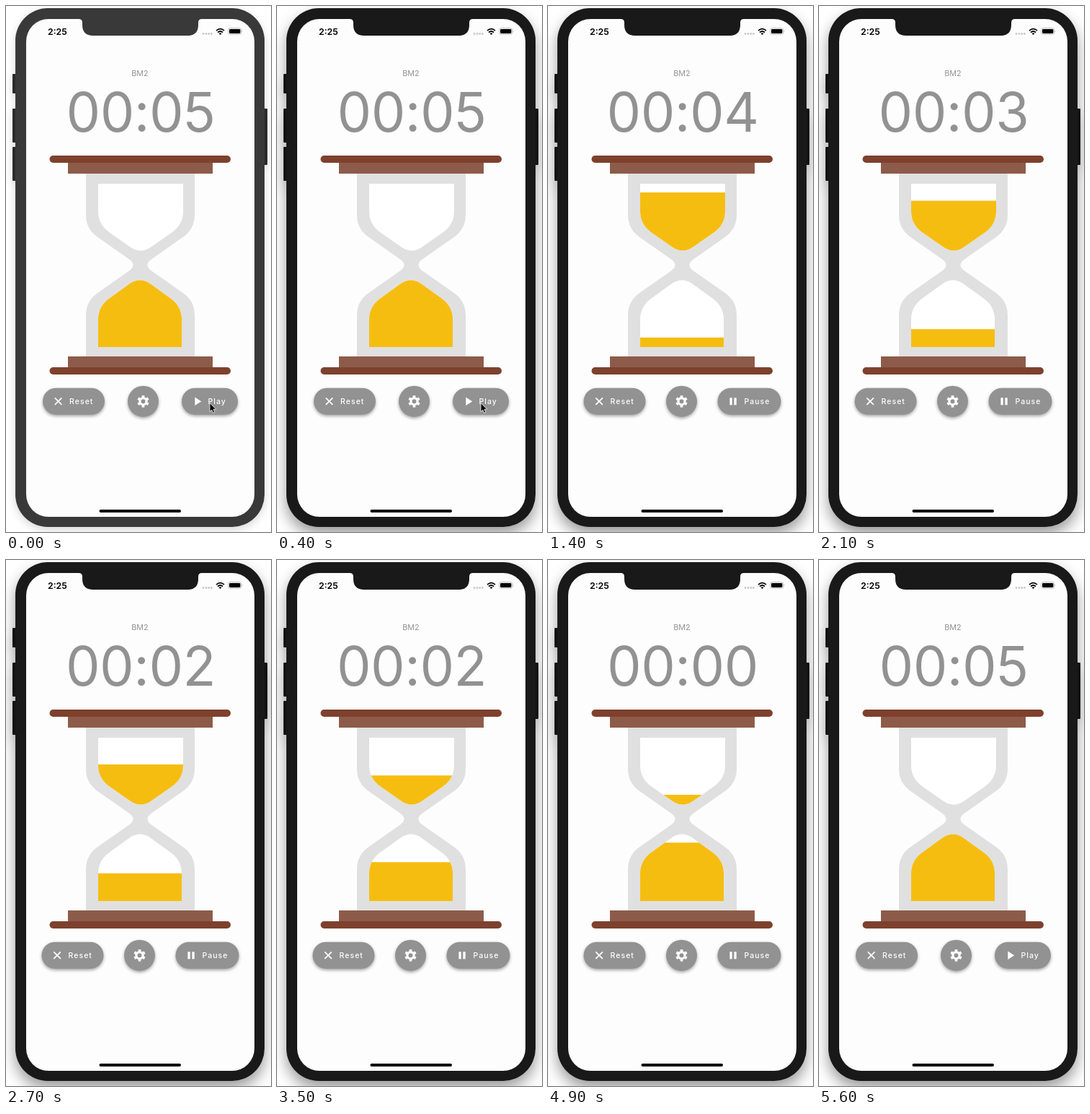
These frames come from a looping animation (368x728 px, 6.4 s). An HTML page:

```html
<!DOCTYPE html>
<html lang="en">
<head>
<meta charset="utf-8">
<title>Hourglass timer</title>
<style>
  html, body { margin: 0; width: 100%; height: 100%; overflow: hidden; background: #fff; }
  svg { display: block; width: 368px; height: 728px; font-family: Inter, sans-serif; }
  .btn { filter: drop-shadow(0 2px 2px rgba(0, 0, 0, .35)); fill: #929292; }
  .label { font-size: 10.5px; font-weight: 500; letter-spacing: 1.05px; fill: #fff; }
  .icon { fill: none; stroke: #fff; }
  .sand { fill: #f6bd11; }
</style>
</head>
<body>
<svg viewBox="0 0 368 728">
  <defs>
    <clipPath id="topClip"><path class="topBulb"/></clipPath>
    <clipPath id="bottomClip"><path class="bottomBulb"/></clipPath>
  </defs>

  <g id="phone">
    <path id="keys" d="M9 95q0-1 1-1h5v27h-5q-1 0-1-1zM9 143q0-1 1-1h5v47h-5q-1 0-1-1zM9 196q0-1 1-1h5v47h-5q-1 0-1-1zM357 142h5q1 0 1 1v76q0 1-1 1h-5z"/>
    <rect id="body" x="13" y="3" width="346" height="718" rx="45"/>
  </g>
  <rect x="28" y="18" width="317" height="689" rx="31" fill="#fdfdfd"/>
  <path id="notch" d="M101 17.5V18q5 0 5 5v3q0 15 15 15h131q15 0 15-15v-3q0-5 5-5v-.5z"/>

  <!-- status bar -->
  <text x="58" y="39.5" font-size="12.3" font-weight="600">2:25</text>
  <g fill="#c9c9c9">
    <circle cx="274" cy="38.5" r="1.4"/><circle cx="278" cy="38.5" r="1.4"/>
    <circle cx="281.7" cy="38.5" r="1.4"/><circle cx="285.3" cy="38.5" r="1.4"/>
  </g>
  <g fill="none" stroke="#000" stroke-width="1.7">
    <path d="M292 34.2q5.5-5 11 0M294 36.5q3.5-3 7 0"/>
    <path d="M297.5 40l-2-2q2-1.5 4 0z" fill="#000" stroke="none"/>
  </g>
  <rect x="308.7" y="30.7" width="18" height="8.6" rx="2.5" fill="none" stroke="#aaa" stroke-width=".8"/>
  <rect x="310" y="32" width="15.4" height="6" rx="1.4"/>
  <path d="M327.7 33.5q1.6 1.5 0 3z" fill="#aaa"/>

  <g text-anchor="middle" fill="#929292">
    <text x="186" y="97" font-size="10.8">BM2</text>
    <text id="clock" x="187" y="174" font-size="75.5" letter-spacing="-.5"></text>
  </g>

  <!-- hourglass -->
  <path fill="#e0e0e0" d="M111 232V289Q111 308 126 319L171 350.5Q182 358.5 171 366.5L126 398Q111 409 111 428V485H262V428Q262 409 247 398L202 366.5Q191 358.5 202 350.5L247 319Q262 308 262 289V232z"/>
  <path class="topBulb" fill="#fff"/>
  <path class="bottomBulb" fill="#fff"/>
  <g clip-path="url(#topClip)"><rect id="topSand" class="sand" x="120" width="134" height="120"/></g>
  <g clip-path="url(#bottomClip)"><rect id="bottomSand" class="sand" x="120" width="134" height="120"/></g>
  <g fill="#8d5b49">
    <rect x="86" y="216" width="201" height="16"/><rect x="86" y="485" width="201" height="16"/>
  </g>
  <g fill="#7d412e">
    <rect x="60.5" y="207" width="251.5" height="10" rx="5"/><rect x="60.5" y="500" width="251.5" height="10" rx="5"/>
  </g>

  <!-- controls -->
  <g id="reset">
    <rect class="btn" x="51" y="528.7" width="86" height="37" rx="18.5"/>
    <path class="icon" stroke-width="1.7" d="M67.8 542.3l9.6 9.6m0-9.6l-9.6 9.6"/>
    <text class="label" x="88" y="551">Reset</text>
  </g>
  <g id="settings">
    <circle class="btn" cx="190.5" cy="547.2" r="21.5"/>
    <circle class="icon" cx="190.5" cy="547.2" r="4.6" stroke-width="3.2"/>
    <circle class="icon" cx="190.5" cy="547.2" r="6.9" stroke-width="2.8" pathLength="12" stroke-dasharray="1 1" stroke-dashoffset="-.5"/>
  </g>
  <g id="play">
    <rect class="btn" x="244" y="528.7" width="78" height="37" rx="18.5"/>
    <path fill="#fff" d="M262.3 541.5v11.4l8.9-5.7z"/>
    <text class="label" x="280.5" y="551">Play</text>
  </g>
  <g id="pause">
    <rect class="btn" x="235.5" y="528.7" width="88" height="37" rx="18.5"/>
    <path fill="#fff" d="M252.4 542.2h3.3v10h-3.3zM258.4 542.2h3.3v10h-3.3z"/>
    <text class="label" x="272.5" y="551">Pause</text>
  </g>

  <rect x="129.5" y="697" width="113.5" height="4" rx="2"/>
  <path id="cursor" d="M283 549.5v12l2.8-2.5 1.8 4.2 2.2-.9-1.9-4.1h3.8z" stroke="#fff" stroke-width=".8"/>
</svg>

<script>
const LOOP = 6400, START = 800, END = 5500;
const digitTimes = [1700, 2700, 3900, 4900];
const sandTimes = [1400, 1700, 2000, 2400, 2700, 3100, 3500, 3900, 4300, 4900];
const $ = id => document.getElementById(id);
const show = (id, on) => $(id).style.display = on ? "" : "none";

// One chamber of the glass; dir = 1 narrows downwards, -1 upwards.
function bulb(right, base, dir) {
  const left = 128, mid = (left + right) / 2, y = d => base + dir * d;
  return `M${left} ${base}V${y(38)}Q${left} ${y(56)} ${left + 15} ${y(67)}` +
    `L${mid - 14.5} ${y(87.5)}Q${mid} ${y(97.5)} ${mid + 14.5} ${y(87.5)}` +
    `L${right - 15} ${y(67)}Q${right} ${y(56)} ${right} ${y(38)}V${base}z`;
}
for (const p of document.querySelectorAll(".topBulb")) p.setAttribute("d", bulb(246, 246, 1));
for (const p of document.querySelectorAll(".bottomBulb")) p.setAttribute("d", bulb(244, 472, -1));

function draw(t) {
  const running = t >= START && t < END;

  // The window gains focus: darker body, deeper shadow.
  const focus = Math.min(1, t / 400), grey = 57 - 32 * focus;
  const shade = v => `rgb(${v},${v},${v})`;
  $("body").style.fill = $("notch").style.fill = shade(grey);
  $("keys").style.fill = shade(grey * .75);
  $("phone").style.filter =
    `drop-shadow(0 ${4 + 6 * focus}px ${6 + 4 * focus}px rgba(0,0,0,${.16 + .24 * focus}))`;

  const elapsed = digitTimes.filter(d => t >= d).length;
  $("clock").textContent = "00:0" + (running ? 4 - elapsed : 5);

  // The sand level is refreshed in steps.
  const refreshed = t < 1400 ? t : sandTimes.filter(s => t >= s).pop();
  const progress = running ? (refreshed - 770) / 4810 : 1;
  $("topSand").setAttribute("y", running ? 246 + 92 * progress : 400);
  $("bottomSand").setAttribute("y", 471 - 93 * progress);

  show("play", !running);
  show("pause", running);
  $("reset").setAttribute("transform", `translate(${running ? -1.5 : 0})`);
  $("settings").setAttribute("transform", `translate(${running ? -5 : 0})`);
  show("cursor", t < 1000);
}

function tick() {
  draw(Math.floor(performance.now() % LOOP / 100) * 100);
  requestAnimationFrame(tick);
}
tick();
</script>
</body>
</html>
```
